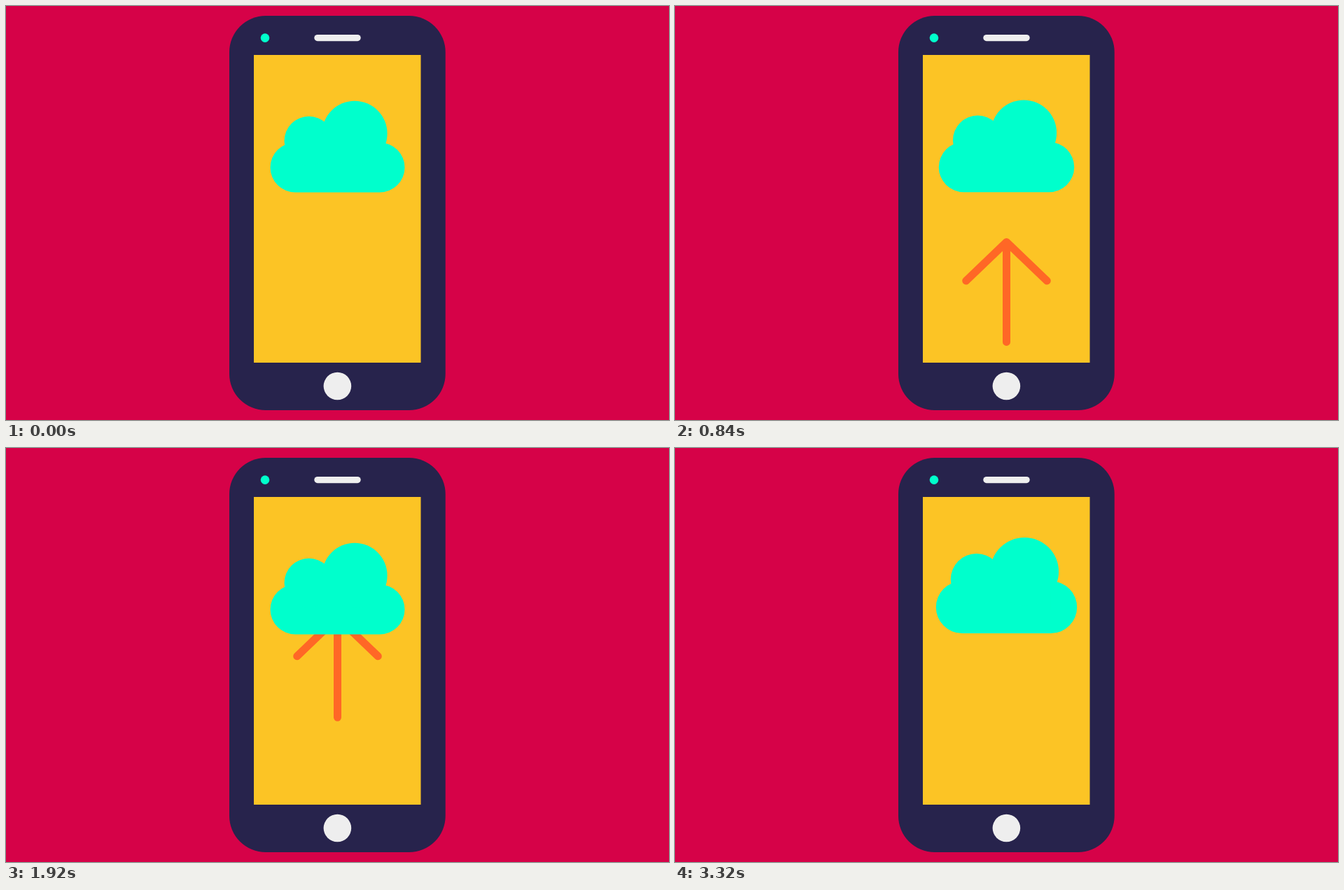
Animation, 947 px wide and 592 px high, one loop 3360 ms. Source, as an HTML page with a canvas:

```html
<!DOCTYPE html>
<html lang="en">
<head>
<meta charset="utf-8">
<title>Cloud upload</title>
<style>
  html, body { margin: 0; width: 100%; height: 100%; overflow: hidden; background: #d60248; }
  canvas { display: block; }
</style>
</head>
<body>
<canvas id="stage" width="947" height="592"></canvas>
<script>
const ctx = document.getElementById('stage').getContext('2d');
const LOOP = 3360, FRAME = 40, PULSE = 960;
const RED = '#d60248', NAVY = '#27234c', YELLOW = '#fcc425',
      MINT = '#00ffcc', ORANGE = '#ff6726', WHITE = '#eeeeee';

// Eased progress from 0 to 1, starting at `start` and lasting `span` ms.
function ease(t, start, span) {
  const u = Math.min(1, Math.max(0, (t - start) / span));
  return u * u * (3 - 2 * u);
}

function circle(x, y, r, color) {
  ctx.fillStyle = color;
  ctx.beginPath();
  ctx.arc(x, y, r, 0, Math.PI * 2);
  ctx.fill();
}

function box(x, y, w, h, r, color) {
  ctx.fillStyle = color;
  ctx.beginPath();
  ctx.roundRect(x, y, w, h, r);
  ctx.fill();
}

function strokes(color, lines) {
  ctx.strokeStyle = color;
  ctx.lineWidth = 11;
  ctx.lineCap = ctx.lineJoin = 'round';
  ctx.beginPath();
  for (const [start, ...rest] of lines) {
    ctx.moveTo(...start);
    for (const p of rest) ctx.lineTo(...p);
  }
  ctx.stroke();
}

function drawPhone() {
  ctx.fillStyle = RED;
  ctx.fillRect(0, 0, 947, 592);
  box(319, 14, 308.7, 564, 52, NAVY);
  box(354, 70, 238.5, 440, 0, YELLOW);
  circle(370, 45.6, 6.3, MINT);
  box(440.3, 41, 66.4, 9.2, 4.6, WHITE);
  circle(473.4, 543.5, 19.8, WHITE);
}

function drawArrow(t) {
  const dy = 196 * (1 - ease(t, 0, 1000)) - 208 * ease(t, 1492, 1000);
  ctx.save();
  ctx.beginPath();
  ctx.rect(354, 200, 238.5, 310);
  ctx.clip();
  ctx.translate(473.5, 324 + dy);
  strokes(ORANGE, [[[0, 0], [0, 143]], [[-57.8, 55.5], [0, 0], [57.8, 55.5]]]);
  ctx.restore();
}

function drawCloud(t) {
  const phase = t % PULSE, half = PULSE / 2;
  const s = 1 + 0.05 * ease(half - Math.abs(phase - half), 0, half);
  ctx.save();
  ctx.translate(473.5, 296);
  ctx.scale(s, s);
  ctx.translate(-473.5, -296);
  box(377.5, 195.3, 192, 71.2, 35.6, MINT);
  box(413, 195.3, 121, 40, 0, MINT);
  circle(432.7, 192.9, 35.2, MINT);
  circle(498, 182.4, 46.6, MINT);
  ctx.restore();
}

function drawCross(t) {
  const k = ease(t, 2000, 500) - ease(t, 2800, 500);
  if (k <= 0) return;
  const a = 48.2;
  ctx.save();
  ctx.globalAlpha = k;
  ctx.translate(475.2, 205.3);
  ctx.scale(k, k);
  strokes(RED, [[[-a, -a], [a, a]], [[a, -a], [-a, a]]]);
  ctx.restore();
}

function draw(t) {
  drawPhone();
  drawArrow(t);
  drawCloud(t);
  drawCross(t);
}

const begin = performance.now();
function tick() {
  const t = Math.max(0, performance.now() - begin) % LOOP;
  draw(Math.floor(t / FRAME) * FRAME);
  requestAnimationFrame(tick);
}
tick();
</script>
</body>
</html>
```
